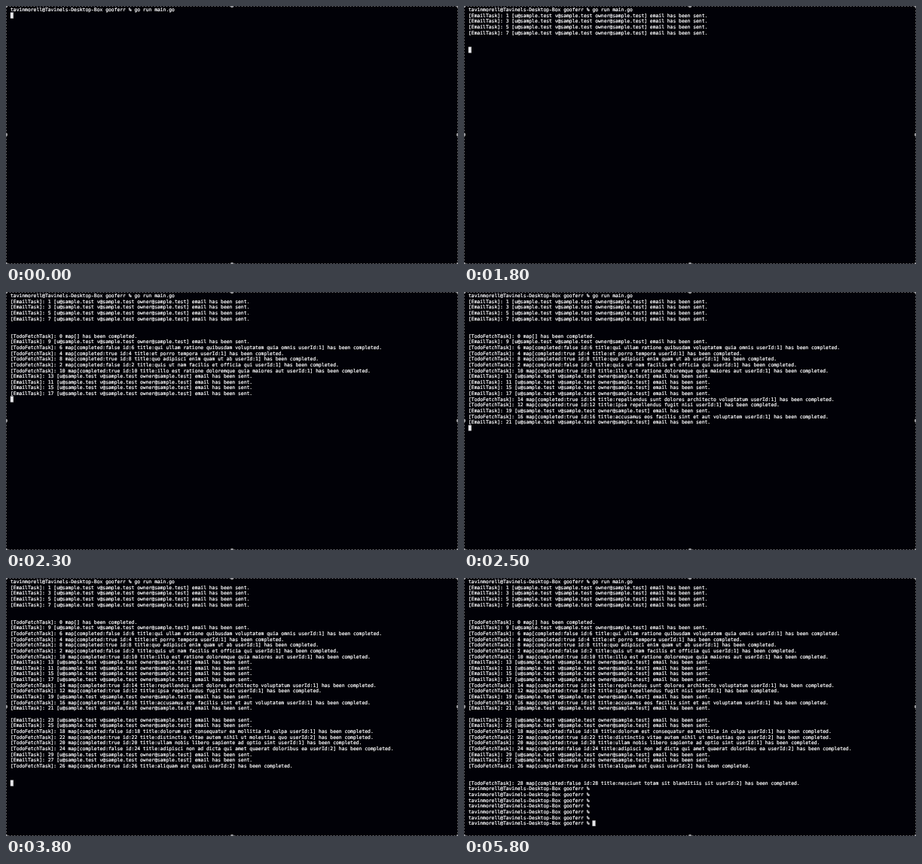
Write an HTML page that moves like this. It is 600 by 343 pixels and loops after 7.2 s.

```html
<!DOCTYPE html>
<html lang="en">
<head>
<meta charset="utf-8">
<title>Terminal session</title>
<style>
  html, body { margin: 0; width: 100%; height: 100%; overflow: hidden; background: #010107; }
  #stage { position: relative; width: 600px; height: 343px; overflow: hidden; }
  /* Laid out at ten times the size so that fractional metrics stay exact. */
  #terminal {
    position: absolute; left: 5.7px; top: 1.2px; margin: 0;
    font: 63.5px/76.5px "DejaVu Sans Mono", monospace;
    font-variant-ligatures: none;
    text-rendering: geometricPrecision;
    color: #fff;
    -webkit-text-stroke: 2.2px #fff;
    transform: scale(.1); transform-origin: 0 0;
  }
  #cursor { background: #e6e6e9; box-shadow: 0 0 0 2px #e6e6e9; }
  svg { position: absolute; inset: 0; }
</style>
</head>
<body>
<div id="stage">
  <pre id="terminal"><span id="output"></span><span id="cursor"> </span></pre>
  <svg width="600" height="343">
    <rect x=".5" y=".5" width="599" height="342" fill="none" stroke="#66666a" stroke-dasharray="2 2"/>
    <g id="handles" fill="#98989c"></g>
  </svg>
</div>
<script>
const LOOP = 7200;
const FIRST_PROMPT_ROW = 36;
const prompt = "tavinmorell@Tavinels-Desktop-Box gooferr % ";

const email = n =>
  `[EmailTask]: ${n} [u@sample.test v@sample.test owner@sample.test] email has been sent.`;
const todo = (id, completed, title, userId = 1) =>
  `[TodoFetchTask]: ${id} map[completed:${completed} id:${id} title:${title} userId:${userId}] has been completed.`;

const lines = [
  prompt + "go run main.go",
  ...[1, 3, 5, 7].map(email),
  "", "",
  "[TodoFetchTask]: 0 map[] has been completed.",
  email(9),
  todo(6, false, "qui ullam ratione quibusdam voluptatem quia omnis"),
  todo(4, true, "et porro tempora"),
  todo(8, true, "quo adipisci enim quam ut ab"),
  todo(2, false, "quis ut nam facilis et officia qui"),
  todo(10, true, "illo est ratione doloremque quia maiores aut"),
  ...[13, 11, 15, 17].map(email),
  todo(14, true, "repellendus sunt dolores architecto voluptatum"),
  todo(12, true, "ipsa repellendus fugit nisi"),
  email(19),
  todo(16, true, "accusamus eos facilis sint et aut voluptatem"),
  email(21),
  "",
  ...[23, 25].map(email),
  todo(18, false, "dolorum est consequatur ea mollitia in culpa"),
  todo(22, true, "distinctio vitae autem nihil ut molestias quo", 2),
  todo(20, true, "ullam nobis libero sapiente ad optio sint"),
  todo(24, false, "adipisci non ad dicta qui amet quaerat doloribus ea", 2),
  ...[29, 27].map(email),
  todo(26, true, "aliquam aut quasi", 2),
  "", "",
  todo(28, false, "nesciunt totam sit blanditiis sit", 2),
  ...Array(6).fill(prompt),
];

// [time in ms, row the cursor has reached]
const steps = [
  [0, 1], [1000, 4], [1100, 5], [1200, 6],
  [1800, 7], [1900, 8], [2000, 10], [2100, 13], [2200, 15], [2300, 18], [2400, 20], [2500, 23],
  [2600, 25], [2700, 26], [2900, 30], [3000, 32],
  [3200, 33], [3300, 34], [3800, 35], [4100, 41], [4400, 42],
];

const output = document.getElementById("output");
let shownRow = -1;

function draw() {
  const time = performance.now() % LOOP;
  const row = steps.findLast(([start]) => start <= time)[1];
  if (row !== shownRow) {
    output.textContent = lines.slice(0, row).join("\n") + "\n" +
      (row >= FIRST_PROMPT_ROW ? prompt : "");
    shownRow = row;
  }
  requestAnimationFrame(draw);
}

// Selection handles on the corners and edge midpoints.
let handles = "";
for (const x of [0, 300, 600])
  for (const y of [0, 171, 343])
    if (x !== 300 || y !== 171) handles += `<circle cx="${x}" cy="${y}" r="2.2"/>`;
document.getElementById("handles").innerHTML = handles;

draw();
</script>
</body>
</html>
```
